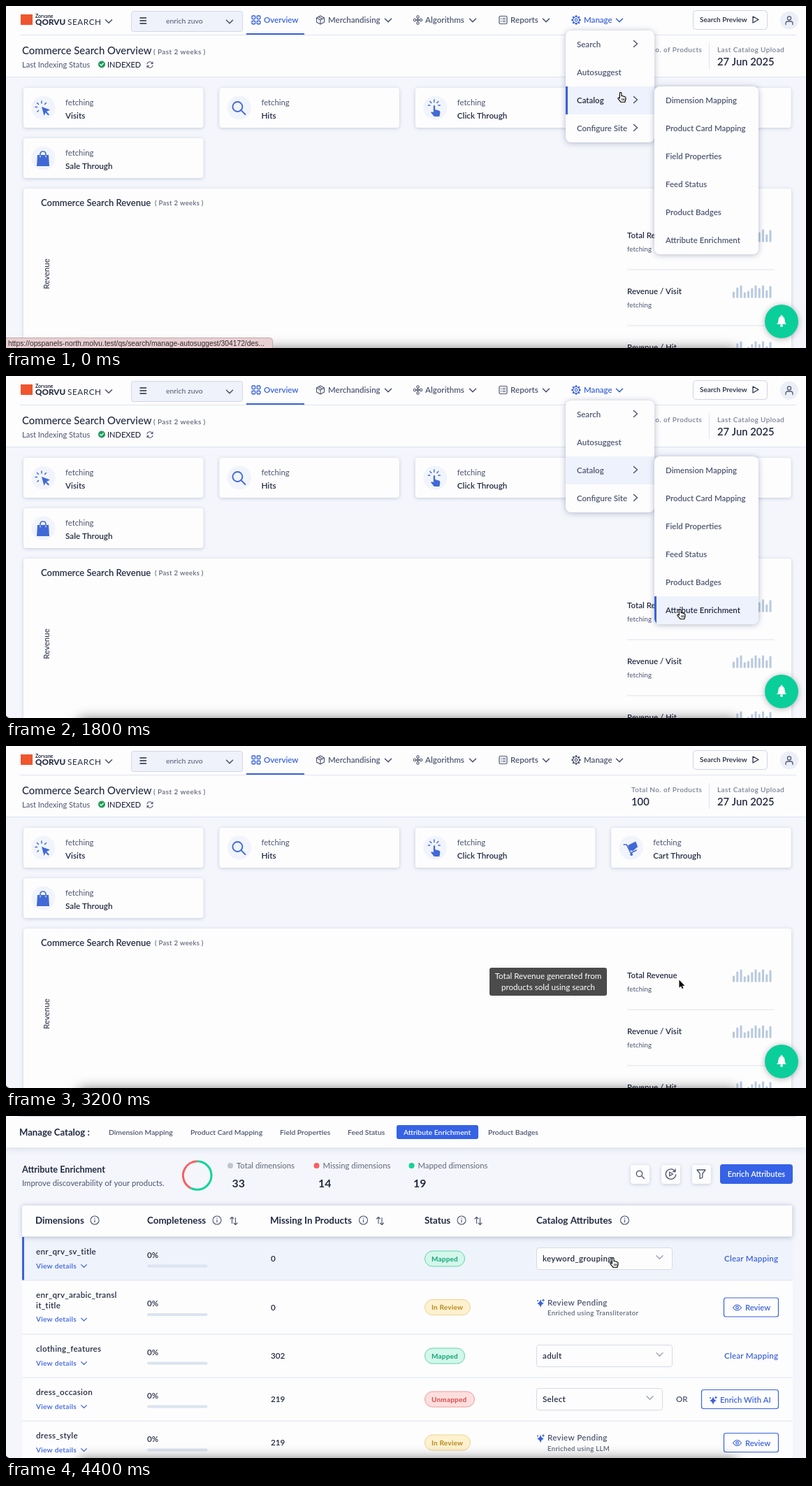
An HTML page with a canvas that plays this animation: 1145 by 489 pixels, repeating every 4600 ms.

```html
<!DOCTYPE html>
<html lang="en">
<head>
<meta charset="utf-8">
<title>Catalog menu walkthrough</title>
<style>
html, body { margin: 0; width: 100%; height: 100%; overflow: hidden; background: #f4f6fc; }
canvas { display: block; width: 1145px; height: 489px; }
</style>
</head>
<body>
<canvas id="stage"></canvas>
<script>
const W = 1145, H = 489, LOOP = 4600, STEP = 200;
const BLUE = '#3a62dc', ICON = '#4169d6', DARK = '#232a40', MID = '#4d5570', GREY = '#61687a',
  WHITE = '#fdfdfe', PAGE = '#f4f6fc', HOVER = '#eef2fc', LINE = '#dfe3ec';
const canvas = document.getElementById('stage');
const dpr = window.devicePixelRatio || 1;
canvas.width = W * dpr;
canvas.height = H * dpr;
const c = canvas.getContext('2d');

// y is the middle of the capitals
function text(s, x, y, size, weight, color, gap = 0, align = 'left', face = 'Lato, "Open Sans", sans-serif') {
  c.font = `${weight} ${size}px ${face}`;
  c.letterSpacing = gap + 'px';
  c.textAlign = align;
  c.fillStyle = color;
  c.fillText(s, x, y + size * 0.36);
}

function box(x, y, w, h, r, fill, stroke, lw = 1) {
  c.beginPath();
  c.roundRect(x, y, w, h, r);
  if (fill) { c.fillStyle = fill; c.fill(); }
  if (stroke) { c.strokeStyle = stroke; c.lineWidth = lw; c.stroke(); }
}

function raised(x, y, w, h, r, fill, blur = 5, shade = 'rgba(60,75,120,.25)') {
  c.save();
  c.shadowColor = shade;
  c.shadowBlur = blur * dpr;
  c.shadowOffsetY = dpr;
  box(x, y, w, h, r, fill);
  c.restore();
}

function disc(x, y, r, fill, stroke, lw = 1.2) {
  c.beginPath();
  c.arc(x, y, r, 0, Math.PI * 2);
  if (fill) { c.fillStyle = fill; c.fill(); }
  if (stroke) { c.strokeStyle = stroke; c.lineWidth = lw; c.stroke(); }
}

function path(d, x, y, stroke, fill, lw = 1.3) {
  c.save();
  c.translate(x, y);
  c.lineCap = c.lineJoin = 'round';
  const p = new Path2D(d);
  if (fill) { c.fillStyle = fill; c.fill(p); }
  if (stroke) { c.strokeStyle = stroke; c.lineWidth = lw; c.stroke(p); }
  c.restore();
}

const rule = (x, y, w, color) => box(x, y, w, 1, 0, color);
const down = (x, y, color, s = 4.5, lw = 1.6) =>
  path(`M${-s} ${-s / 2}L0 ${s / 2}L${s} ${-s / 2}`, x, y, color, null, lw);
const right = (x, y) => path('M-2.5 -4.5L2.5 0L-2.5 4.5', x, y, MID, null, 1.5);

function lens(x, y, r, color, lw) {
  disc(x - 1, y - 1, r, null, color, lw);
  path(`M${r * 0.6} ${r * 0.6}L${r * 1.5} ${r * 1.5}`, x - 0.5, y - 0.5, color, null, lw);
}

function gear(x, y, color) {
  disc(x, y, 4.6, null, color, 1.3);
  disc(x, y, 1.8, null, color, 1.2);
  for (let i = 0; i < 8; i++) {
    const a = i * Math.PI / 4, u = Math.cos(a), v = Math.sin(a);
    path(`M${u * 5} ${v * 5}L${u * 6} ${v * 6}`, x, y, color, null, 2);
  }
}

function info(x, y) {
  disc(x, y, 6, null, MID, 1.1);
  path('M0 -.4V2.8M0 -2.8V-2.6', x, y, MID, null, 1.2);
}

const sortIcon = (x, y) =>
  path('M-2.5 4V-5M-5 -2.5L-2.5 -5L0 -2.5M2.5 -4V6M0 3.5L2.5 6L5 3.5', x, y, MID, null, 1.1);

const sparkle = (x, y) => {
  path('M0 -6Q1 -1 5 0Q1 1 0 6Q-1 1 -5 0Q-1 -1 0 -6Z', x, y + 0.5, null, BLUE);
  path('M0 -2.5Q.3 -.3 2.3 0Q.3 .3 0 2.5Q-.3 .3 -2.3 0Q-.3 -.3 0 -2.5Z', x + 4, y - 4, null, BLUE);
  disc(x - 4, y - 3.5, 1, BLUE);
};

// ---------- overview page ----------
function navBar(menuOpen) {
  box(0, 0, W, 101, 0, WHITE);
  box(21, 12, 17, 15, 0, '#f0552d');
  text('Zorvane', 42, 14, 7, 700, DARK);
  text('QORVU', 42, 23, 11.7, 800, DARK);
  text('SEARCH', 88, 23, 11.7, 400, DARK, 0.6);
  down(147, 22, MID);

  box(179.5, 7.5, 159, 29, 3, '#eff2fa', '#d2d8e6');
  for (const y of [17, 21, 25]) path('M0 0H8.5', 192, y, DARK, null, 1.5);
  text('enrich zuvo', 229, 21.5, 10.4, 400, MID);
  down(320, 22.5, MID);

  for (let i = 0; i < 4; i++) box(352 + (i % 2) * 7.2, 14 + (i >> 1) * 7.2, 4.6, 4.6, 1, null, BLUE, 1.4);
  text('Overview', 369, 20, 11.5, 600, BLUE);
  box(344, 39, 83, 2, 0, BLUE);

  path('M0 -6L5.5 -3V3L0 6L-5.5 3V-3ZM-5.5 -3L0 0L5.5 -3M0 0V6M-2.8 -4.5L2.8 -1.5', 450, 20, MID, null, 1.1);
  text('Merchandising', 461, 20, 11.5, 600, MID);
  down(547, 20.5, MID);

  path('M-3 0H3M0 -3V3', 589.5, 20, MID);
  for (const [x, y] of [[-4.5, 0], [4.5, 0], [0, -4.5], [0, 4.5]]) disc(589.5 + x, 20 + y, 1.7, WHITE, MID, 1.1);
  text('Algorithms', 600, 20, 11.6, 600, MID);
  down(668, 20.5, MID);

  box(706, 14.5, 11, 11, 1.5, null, MID, 1.2);
  path('M2.5 3H3M5 3H8.5M2.5 5.5H3M5 5.5H8.5M2.5 8H3M5 8H8.5', 706, 14.5, MID, null, 1);
  text('Reports', 722, 20, 11.6, 600, MID);
  down(773, 20.5, MID);

  const tone = menuOpen ? BLUE : MID;
  gear(816, 20, tone);
  text('Manage', 827, 20, 11.5, 600, tone);
  down(878, 20.5, tone);

  box(983.5, 6.5, 106, 27, 4, WHITE, '#cfd5e3');
  text('Search Preview', 993, 19.5, 10, 600, DARK);
  path('M0 0L8 4.5L0 9Z', 1069, 15, DARK, null, 1.2);
  disc(1121, 20.5, 13, '#eceff7');
  disc(1121, 17.5, 2.6, null, MID);
  path('M-5 4.5V3Q-5 0 -2 0H2Q5 0 5 3V4.5', 1121, 22, MID);
  rule(20, 41, 1111, LINE);
}

function subHeader() {
  text('Commerce Search Overview', 23, 64, 14.85, 500, DARK);
  text('( Past 2 weeks )', 211, 65.5, 10, 600, GREY, 0.4);
  text('Last Indexing Status', 23, 84, 11.1, 400, MID);
  disc(137, 83.5, 5, '#1f9d5c');
  path('M-2.2 0L-.6 1.7L2.3 -1.5', 137, 83.5, '#fff', null, 1.2);
  text('INDEXED', 145, 84, 11, 500, DARK);
  path('M-4 -1A4 4 0 0 1 3.5 -2M4 -4V-1.5H1.5M4 1A4 4 0 0 1 -3.5 2M-4 4V1.5H-1.5', 206, 84, MID, null, 1.1);
  text('Total No. of Products', 895, 62.5, 10, 600, '#7a8194', 0.4);
  text('100', 895, 80, 14.8, 600, DARK);
  box(1006, 53, 1, 37, 0, LINE);
  text('Last Catalog Upload', 1018, 62.5, 10, 600, '#7a8194', 0.4);
  text('27 Jun 2025', 1018, 80, 14.8, 600, DARK);
  rule(0, 101, W, '#dce2f0');
}

const RAYS = 'M0 -10V-7M-6.5 -7.5L-4.5 -5.5M6.5 -7.5L4.5 -5.5M-9 -1.5H-6.5';
const statIcons = {
  Visits(x, y) {
    path('M-2 -2L10 2.5L5 5L9 9L7.5 10.5L3.5 6.5L1.5 11Z', x, y, null, ICON);
    path(RAYS + 'M-6 5L-4.5 3.5', x - 2, y, ICON, null, 1.5);
  },
  Hits(x, y) { lens(x - 1, y - 1, 7, ICON, 1.9); },
  'Click Through'(x, y) {
    path('M-2 -3Q-1 -5 .3 -3V2L6 3.5Q8 4.2 7.5 7L6.5 12H-1L-5.5 6.5Q-5.5 4.5 -2 6Z', x, y, null, ICON);
    path('M0 -12V-8.5M-6 -9.5L-4 -7.5M6 -9.5L4 -7.5M-8.5 -4H-6M6 -4H8.5', x - 1, y, ICON, null, 1.4);
  },
  'Cart Through'(x, y) {
    path('M-4 -4L7 -9.5L10 -2L3 4L-2 3Z', x, y, null, ICON);
    path('M-10 -5H-6L0 7L8 3', x, y, ICON, null, 1.6);
    disc(x + 1, y + 9, 1.9, ICON);
  },
  'Sale Through'(x, y) {
    path('M-8 -5H8L9 11H-9Z', x, y, null, ICON);
    path('M-4 -3V-6Q-4 -10 0 -10Q4 -10 4 -6V-3', x, y, ICON, null, 1.6);
    path('M-4 -4V-2M4 -4V-2', x, y, '#fff', null, 1);
  }
};

function statCards() {
  Object.keys(statIcons).forEach((name, i) => {
    const x = 25 + (i % 4) * 280.4, y = 117 + (i >> 2) * 72;
    raised(x, y, 257.5, 57, 4, WHITE);
    disc(x + 28.5, y + 28.5, 17, '#f1f4fb');
    statIcons[name](x + 28, y + 29);
    text('fetching', x + 60, y + 20.5, 11.3, 400, MID);
    text(name, x + 60, y + 39.5, 11.7, 600, DARK);
  });
}

const BARS = [9, 15, 18, 8, 10, 14, 18, 14, 18, 11, 17];
function revenueCard() {
  raised(25, 261, 1099, 260, 4, WHITE);
  text('Commerce Search Revenue', 50, 281, 13.05, 600, DARK);
  text('( Past 2 weeks )', 213, 282, 9.5, 600, GREY, 0.3);
  c.save();
  c.translate(57.5, 383);
  c.rotate(-Math.PI / 2);
  text('Revenue', 0, 0, 11.5, 400, DARK, 0, 'center');
  c.restore();
  ['Total Revenue', 'Revenue / Visit', 'Revenue / Hit'].forEach((name, i) => {
    const y = 328 + i * 80;
    text(name, 889, y, 11.55, 600, DARK);
    text('fetching', 889, y + 20, 9.6, 400, MID, 0.1);
    BARS.forEach((h, k) => box(1040 + k * 5.25, y + 9.5 - h, 3, h, 1, '#b8c9de'));
    rule(889, y + 48.5, 211, LINE);
  });
}

function bell() {
  raised(1086, 427, 48, 48, 24, '#0acf9b', 9, 'rgba(0,0,0,.3)');
  path('M-7 5Q-4.5 3 -4.5 -1Q-4.5 -6 0 -6.5Q4.5 -6 4.5 -1Q4.5 3 7 5Z', 1110, 450, null, '#fff');
  disc(1110, 457, 1.9, '#fff');
  disc(1110, 443, 1.3, '#fff');
}

function menuItem(s, x, y, w, lit, active) {
  if (lit) box(x, y - 20, w, 40, 0, HOVER);
  if (active) box(x, y - 20, 3, 40, 0, BLUE);
  text(s, x + 16, y, 11.5, 600, active ? DARK : MID);
}

const SUB = ['Dimension Mapping', 'Product Card Mapping', 'Field Properties', 'Feed Status', 'Product Badges', 'Attribute Enrichment'];
function menus(t) {
  const hover = t < 800 ? -1 : t < 1400 ? 0 : t < 1600 ? 1 : t < 1800 ? 3 : 5;
  const shade = 'rgba(50,60,100,.35)';
  raised(801, 35, 127, 160, 8, WHITE, 9, shade);
  ['Search', 'Autosuggest', 'Catalog', 'Configure Site'].forEach((s, i) => {
    const y = 55 + i * 40;
    menuItem(s, 801, y, 127, i === 2, i === 2 && hover < 0);
    if (i !== 1) right(901, y - 1);
  });
  raised(928, 115, 149, 240, 8, WHITE, 9, shade);
  c.save();
  c.beginPath();
  c.roundRect(928, 115, 149, 240, 8);
  c.clip();
  SUB.forEach((s, i) => menuItem(s, 928, 135 + i * 40, 149, i === hover, i === hover));
  c.restore();
}

function tooltip(alpha) {
  c.globalAlpha = alpha;
  box(692, 317, 168, 40, 3, 'rgba(0,0,0,.7)');
  c.globalAlpha = 1;
  text('Total Revenue generated from', 776, 329, 11.6, 400, '#fff', 0, 'center');
  text('products sold using search', 776, 345, 11.6, 400, '#fff', 0, 'center');
}

function overview(t) {
  const open = t < 2600;
  navBar(open);
  subHeader();
  statCards();
  revenueCard();
  if (open) menus(t);
  else tooltip(t < 2800 ? 0.39 : 1);
  bell();
}

// ---------- enrichment page ----------
const TABS = [[147, 0], [264, 1], [392, 2], [489, 3], [569, 5], [690, 4]];
function tabBar() {
  raised(0, -4, W, 49, 0, WHITE, 10, 'rgba(60,75,120,.18)');
  rule(19, 0, 1112, '#cfd7ec');
  text('Manage Catalog :', 19, 23.5, 13.1, 700, DARK);
  box(559, 13, 117, 20, 3, '#3562e6');
  for (const [x, i] of TABS) text(SUB[i], x, 23, 10.35, 600, i === 5 ? '#fff' : MID);
}

function summary() {
  text('Attribute Enrichment', 23, 76, 12.7, 700, DARK);
  text('Improve discoverability of your products.', 23, 96, 11.4, 400, MID);
  const top = -Math.PI / 2, split = top + Math.PI * 2 * 19 / 33;
  [['#0fd596', top, split], ['#f85f60', split, top + Math.PI * 2]].forEach(([color, a, b]) => {
    c.beginPath();
    c.arc(273.7, 85, 20.3, a, b);
    c.strokeStyle = color;
    c.lineWidth = 3;
    c.stroke();
  });
  [[321, 'Total', 33, '#c2c5cc'], [444.5, 'Missing', 14, '#f85f60'], [580.5, 'Mapped', 19, '#0fd596']].forEach(([x, s, n, color]) => {
    disc(x, 71, 4, color);
    text(s + ' dimensions', x + 9, 71, 11.35, 400, GREY);
    text(n, x + 2.5, 96, 15.8, 700, DARK);
  });
  for (const x of [894, 938, 982]) raised(x, 70, 27, 27, 4, WHITE);
  lens(907.5, 83.5, 4.2, MID, 1.3);
  path('M6 -4A7.2 7.2 0 1 0 7.2 1M6.5 -7V-3.5H3M-1.8 -2.8L3 0L-1.8 2.8Z', 951.5, 83, MID, null, 1.3);
  path('M-6 -6H6L1.8 -.5V5L-1.8 6.5V-.5Z', 995, 83, MID, null, 1.3);
  box(1022, 69, 104, 28, 4, '#3562e6');
  text('Enrich Attributes', 1074, 83, 11.05, 600, '#fff', 0, 'center');
}

function tableHead() {
  raised(23, 127, 1103, 46, 3, WHITE, 6, 'rgba(60,75,120,.3)');
  box(22.5, 127.5, 1103, 45, 2, null, '#dde0e8');
  [['Dimensions', 42, 127], ['Completeness', 202, 302, 326], ['Missing In Products', 378, 511.5, 535.5],
    ['Status', 599, 652, 676], ['Catalog Attributes', 759, 885.5]].forEach(([s, x, i, sort]) => {
    text(s, x, 149, 13.4, 700, DARK);
    info(i, 149);
    if (sort) sortIcon(sort, 149.5);
  });
}

const BADGES = {
  Mapped: [58, '#d3f7ea', '#5fd3ad', '#11a577'],
  'In Review': [66, '#fdf1d0', '#ecd28a', '#b78a1c'],
  Unmapped: [72, '#fddede', '#f19a9a', '#d84a4a']
};
const label = (s, x, y, color = DARK) => text(s, x, y, 11.6, 600, color, 0.3);

function picker(s, y, w) {
  box(759.5, y - 15.5, w, 31, 3, WHITE, '#d5dae5');
  label(s, 768, y);
  down(759 + w - 17.5, y - 2, '#9aa3b5', 4.5, 1.4);
}

function outlined(x, y, s, tx) {
  box(x + 0.5, y - 13.5, 1105 - x, 27, 3, WHITE, BLUE, 1.2);
  text(s, tx, y + 0.5, 11.25, 600, BLUE);
}

const ACTIONS = {
  clear(y, s) {
    picker(s, y, 194);
    text('Clear Mapping', 1028, y, 11.6, 600, BLUE, 0.2);
  },
  review(y, s) {
    sparkle(765, y - 6);
    label('Review Pending', 775, y - 7, MID);
    text('Enriched using ' + s, 775, y + 8.5, 9.6, 600, GREY, 0.33);
    outlined(1027, y, 'Review', 1058);
    path('M-6 0Q0 -8 6 0Q0 8 -6 0Z', 1046.5, y + 0.5, BLUE, null, 1.2);
    disc(1046.5, y + 0.5, 1.8, null, BLUE);
  },
  enrich(y, s) {
    picker(s, y, 180);
    text('OR', 959, y, 11.5, 600, MID);
    outlined(995, y, 'Enrich With AI', 1022);
    sparkle(1012, y + 1.5);
  }
};

const ROWS = [
  [['enr_qrv_sv_title'], 0, 'Mapped', 'clear', 'keyword_grouping'],
  [['enr_qrv_arabic_transl', 'it_title'], 0, 'In Review', 'review', 'Transliterator'],
  [['clothing_features'], 302, 'Mapped', 'clear', 'adult'],
  [['dress_occasion'], 219, 'Unmapped', 'enrich', 'Select'],
  [['dress_style'], 219, 'In Review', 'review', 'LLM']
];

function tableRows(p) {
  c.save();
  c.translate(0, 8.75 * (1 - p));
  c.globalAlpha = 0.6 + 0.4 * p;
  box(23, 173, 1103, 330, 0, WHITE);
  c.globalAlpha = Math.pow(p, 1.2);
  let top = 173;
  ROWS.forEach(([names, count, status, action, value], i) => {
    const h = 47 + 15 * names.length, y = top + h / 2, lift = names.length > 1 ? 17.5 : 10.5;
    if (!i) {
      box(23, top, 1103, h, 0, '#eff3fb');
      box(23, top, 3, h, 0, BLUE);
    }
    names.forEach((s, k) => label(s, 43, y - lift + k * 15));
    text('View details', 43, y + lift - 0.5, 10.2, 600, BLUE, 0.25);
    down(111.5, y + lift, BLUE, 3.8, 1.3);
    text('0%', 202, y - 5.5, 11.5, 600, DARK);
    box(202, y + 8.5, 86.5, 4, 2, '#dbe4f0');
    text(count, 379, y, 11.7, 600, DARK);
    const [w, fill, edge, ink] = BADGES[status];
    box(599.5, y - 11, w - 1, 22, 11, fill, edge);
    text(status, 609, y, 10, 700, ink, 0.2);
    ACTIONS[action](y, value);
    top += h;
    rule(23, top - 0.5, 1103, LINE);
  });
  c.restore();
}

function enrichment(t) {
  if (t >= 3800) tableRows(Math.min(1, (t - 3680) / 600));
  if (t >= 3600) tableHead();
  summary();
  tabBar();
}

// ---------- overlays ----------
function bottomEdge() {
  c.save();
  c.shadowColor = 'rgba(0,0,0,.6)';
  c.shadowBlur = 18 * dpr;
  box(105, 491, 940, 20, 0, '#000');
  c.restore();
  path('M0 0V-4Q1 -1 5 0Z', 0, H, null, '#000');
}

function statusBar(t) {
  const alpha = t < 200 ? 1 : t < 400 ? 0.5 : t >= 2200 && t < 3000 ? 1 : 0;
  if (!alpha) return;
  const tail = t < 1000 ? 'manage-autosuggest/304172/des...' : 'catalog/304172/attribute-enrichm...';
  c.globalAlpha = alpha;
  box(-2, 474.5, 383.5, 20, 4, '#e8d0d2', '#c3a9ac');
  text('https://opspanels-north.molvu.test/qs/search/' + tail, 3, 482.5, 10.3, 400, '#33282b', 0, 'left',
    '"Liberation Sans", Arial, sans-serif');
  c.globalAlpha = 1;
}

const MOVES = [[0, 881, 130], [400, 915, 134], [800, 1026, 140], [1000, 1020, 141], [1200, 988, 167], [1400, 984, 192],
  [1600, 974, 262], [1800, 966, 340], [2200, 965, 341], [3200, 965, 341], [3400, 950, 318], [3800, 877, 211], [4400, 870, 209]];
const HAND = 'M4 1.2C5.2 .8 6 1.5 6 2.6V6.2C7 5.6 8 6 8.2 6.7C9.1 6.3 10 6.6 10.3 7.4C11.3 7.1 12 7.8 12 8.8V11L10.8 15H5.2' +
  'L1.2 10.4C.4 9.4 1.4 8.2 2.5 8.9L3.4 9.6V2.4C3.4 1.7 3.6 1.3 4 1.2Z';
const ARROW = 'M0 0V11L2.6 8.8L4.2 12.6L6 11.8L4.4 8.2H8Z';

function pointer(t) {
  let i = 0;
  while (i < MOVES.length - 2 && t >= MOVES[i + 1][0]) i++;
  const [t0, x0, y0] = MOVES[i], [t1, x1, y1] = MOVES[i + 1];
  const k = Math.min(1, (t - t0) / (t1 - t0));
  const x = x0 + (x1 - x0) * k, y = y0 + (y1 - y0) * k;
  if (t >= 2600 && t < 3800) {
    path(ARROW, x - 1.5, y - 6.5, '#fff', null, 2);
    path(ARROW, x - 1.5, y - 6.5, null, '#000');
  } else {
    path(HAND, x - 6, y - 7.5, '#111', '#fff', 1.2);
    path('M6.6 10V12.5M8.4 10V12.5M10 10V12.5', x - 6, y - 7.5, '#111', null, 0.8);
  }
}

function draw(now) {
  const t = Math.floor((now % LOOP) / STEP) * STEP;
  c.setTransform(dpr, 0, 0, dpr, 0, 0);
  box(0, 0, W, H, 0, PAGE);
  if (t < 3400) overview(t);
  else enrichment(t);
  bottomEdge();
  statusBar(t);
  pointer(t);
}

const start = performance.now();
function tick() {
  draw(performance.now() - start);
  requestAnimationFrame(tick);
}
tick();
</script>
</body>
</html>
```
